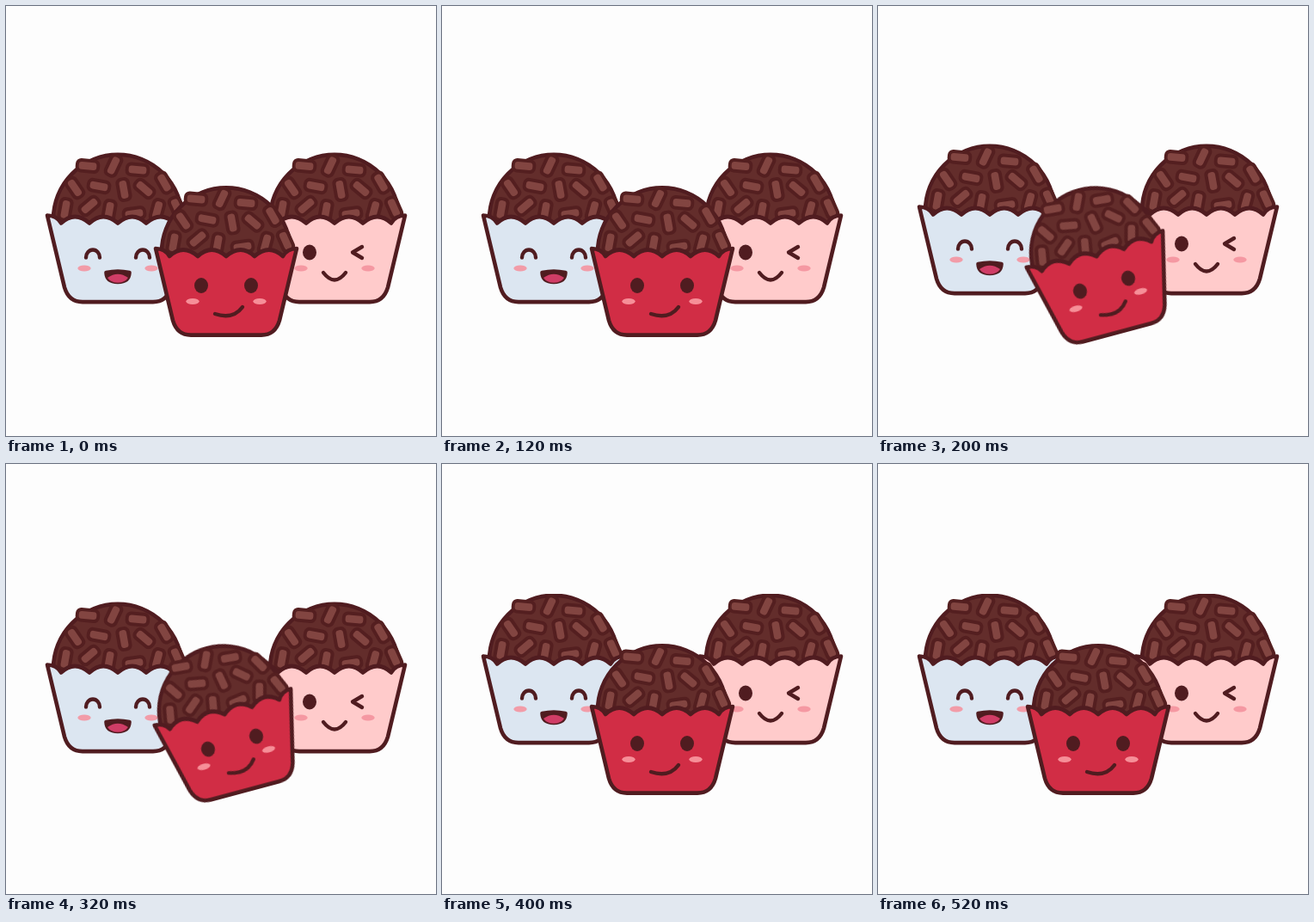
An HTML page without scripts for the animation above (0.6 s loop, 500 by 500 pixels).

```html
<!DOCTYPE html>
<html lang="en">
<head>
<meta charset="utf-8">
<title>Bouncing sweets</title>
<style>
  html, body { margin: 0; width: 100%; height: 100%; overflow: hidden; background: #fdfdfd; }
  svg { display: block; width: 100vw; height: 100vh; }
  .ink { fill: #501c20; }
  .line { fill: none; stroke: #501c20; stroke-width: 4.4; stroke-linecap: round; stroke-linejoin: round; }
  .cup { stroke: #501c20; stroke-width: 4.6; stroke-linejoin: round; }
  .bob { animation: bob .6s step-end infinite; }
  .tilt { transform-origin: 256px 298px; animation: tilt .6s step-end infinite; }
  @keyframes bob {
    0% { transform: translateY(0); }
    33.333% { transform: translateY(-10px); }
    66.666%, 100% { transform: translateY(-20px); }
  }
  @keyframes tilt {
    0% { transform: rotate(0); }
    33.333% { transform: rotate(-15deg); }
    66.666%, 100% { transform: rotate(0); }
  }
</style>
</head>
<body>
<svg viewBox="0 0 500 500">
  <defs>
    <clipPath id="top"><rect y="151.2" width="500" height="349"/></clipPath>

    <g id="bit">
      <rect x="-14.2" y="-8.3" width="28.4" height="16.6" rx="6.5" fill="#541f20"/>
      <rect x="-10.4" y="-4.3" width="20.8" height="8.6" rx="3.5" fill="#824541"/>
    </g>

    <g id="dome">
      <path d="M181 290V286.4A75 75 0 0 1 331 286.4V290Z" fill="#632d2b" stroke="#501c20" stroke-width="4.6"/>
      <use href="#bit" transform="translate(195 275) rotate(-80)"/>
      <use href="#bit" transform="translate(246 277) rotate(-80)"/>
      <use href="#bit" transform="translate(275 280) rotate(-8)"/>
      <use href="#bit" transform="translate(302 276) rotate(-75)"/>
      <use href="#bit" transform="translate(325 273) rotate(66)"/>
      <use href="#bit" transform="translate(223 271) rotate(-40)"/>
      <use href="#bit" transform="translate(206 250) rotate(56)"/>
      <use href="#bit" transform="translate(234 248) rotate(11)"/>
      <use href="#bit" transform="translate(263 252) rotate(80)"/>
      <use href="#bit" transform="translate(287 251) rotate(40)"/>
      <use href="#bit" transform="translate(310 244) rotate(60)"/>
      <use href="#bit" transform="translate(221 224.5) rotate(5)"/>
      <use href="#bit" transform="translate(251 224) rotate(-65)"/>
      <use href="#bit" transform="translate(279 229) rotate(5)"/>
    </g>

    <path id="cup" class="cup" d="M174 282Q185 282 190 291Q206 276 223 291Q239 276 256 291Q273 276 289 291Q306 276 322 291Q327 282 338 282L318 365.6Q313 382.6 297 382.6H215Q199 382.6 194 365.6Z"/>

    <ellipse id="eye" class="ink" rx="8" ry="9"/>
    <path id="smile" class="line" d="M-8 4.5A8 9 0 0 1 8 4.5"/>
    <g id="cheeks">
      <ellipse cx="217" cy="343.5" rx="7.7" ry="3.5"/>
      <ellipse cx="295" cy="343.5" rx="7.7" ry="3.5"/>
    </g>
  </defs>

  <g clip-path="url(#top)">
    <g class="bob">
      <g transform="translate(-126 -38.5)">
        <use href="#dome"/>
        <use href="#cup" fill="#dce6f1"/>
        <use href="#cheeks" fill="#f29ca8"/>
        <use href="#smile" x="227" y="326.5"/>
        <use href="#smile" x="285" y="326.5"/>
        <path class="cup ink" d="M242.5 348.5Q256 345.5 269.5 348.5Q269 359.5 256 359.5Q243 359.5 242.5 348.5Z"/>
        <path d="M244 354.5Q256 346 268 354.5Q264 360.3 256 360.3Q248 360.3 244 354.5Z" fill="#d03d66"/>
      </g>
      <g transform="translate(126 -38.5)">
        <use href="#dome"/>
        <use href="#cup" fill="#ffcbcb"/>
        <use href="#cheeks" fill="#f598a2"/>
        <use href="#eye" x="227" y="325"/>
        <path class="line" d="M288 318.5L277 325L288 331.5M243 348.5Q256 365.5 269 348.5"/>
      </g>
    </g>
    <g class="tilt">
      <use href="#dome"/>
      <use href="#cup" fill="#d12d45"/>
      <use href="#cheeks" fill="#f68f98"/>
      <use href="#eye" x="227" y="325"/>
      <use href="#eye" x="285" y="325"/>
      <path class="line" d="M243 358Q264 365 275 350"/>
    </g>
  </g>
</svg>
</body>
</html>
```
